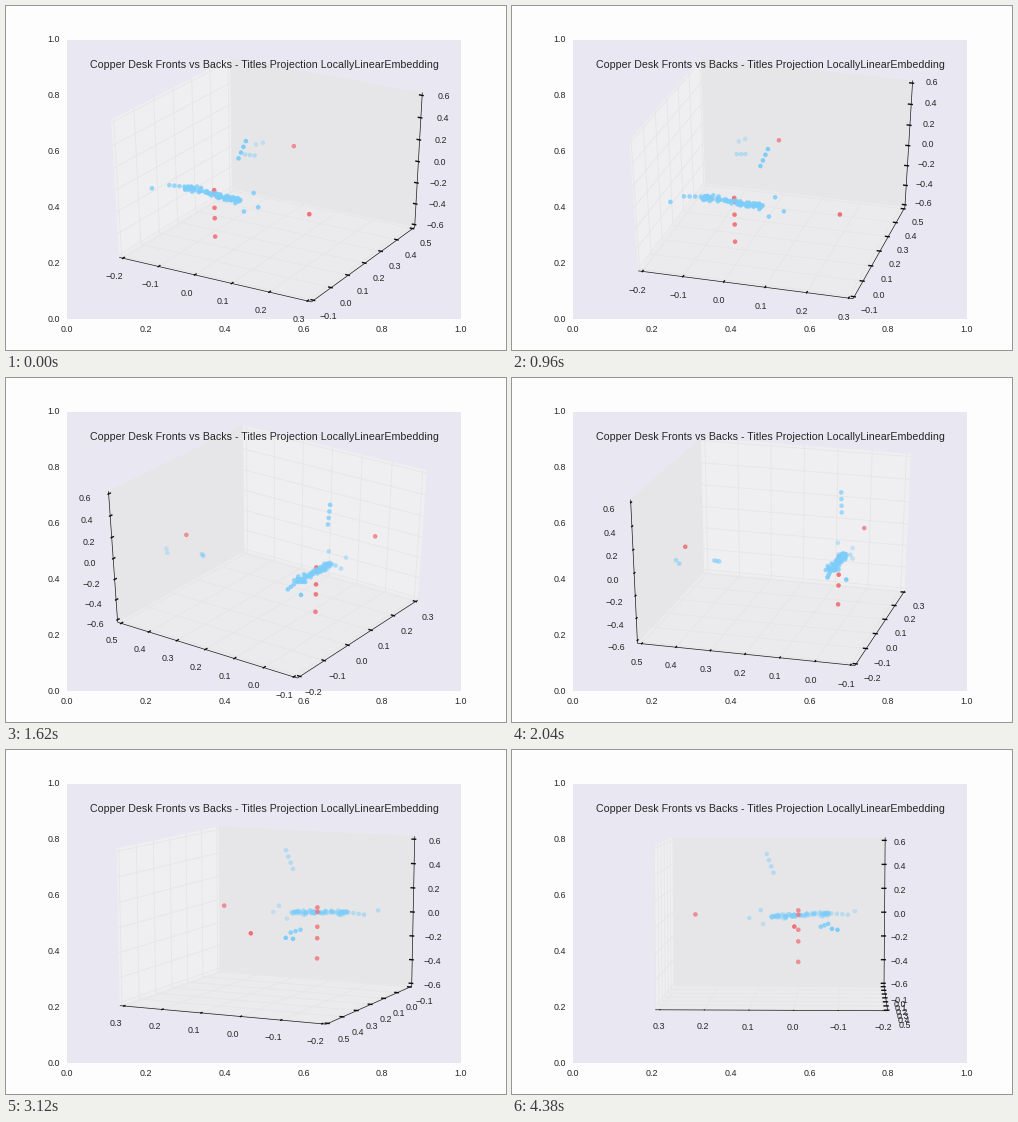
Animation of 500x344 px, one loop 4500 ms. Source, as a matplotlib script:

```python
import numpy as np
import matplotlib.pyplot as plt
from matplotlib.animation import FuncAnimation
from matplotlib.collections import LineCollection
from matplotlib.colors import to_rgb

WIDTH, HEIGHT, DPI = 500, 344, 100
LEFT, RIGHT, TOP, BOTTOM = 61, 455, 34, 313
FRAMES, INTERVAL = 75, 60
INK, RED, BLUE = "0.15", "#f07078", "#7ccdfa"
EDGE = 0.5 + 1 / 48          # the panes reach a little past the limits
LABEL_GAP, LABEL_DROP = 0.076, 3
TICKS = [np.linspace(-0.2, 0.3, 6), np.linspace(-0.1, 0.5, 7), np.linspace(-0.6, 0.6, 7)]
TICK_DIR = [1, 0, 0]
ORIGIN = np.array([-0.1, -1 / 3, 0])     # data zero inside the unit cube

# Camera keys: frame, azimuth, elevation
CAMERA = np.array([(10, -60, 30), (21, -97, 39), (27, -145, 34),
                   (43, -187, 18), (52, -245, 12), (73, -268, 6)])

plt.rcParams["font.family"] = "Liberation Sans"


def px(size):
    return size * 72 / DPI


def monotone_curve(t, times, values):
    """Smooth interpolation that never overshoots the keys."""
    step = np.diff(times)
    slope = np.diff(values) / step
    tangent = np.zeros(len(values))
    tangent[-1] = slope[-1]
    for i, (a, b) in enumerate(zip(slope, slope[1:]), 1):
        if a * b > 0:
            tangent[i] = 2 * a * b / (a + b)
    t = np.clip(t, times[0], times[-1])
    i = min(np.searchsorted(times, t, side="right") - 1, len(step) - 1)
    u, h = (t - times[i]) / step[i], step[i]
    return ((1 + 2 * u) * (1 - u) ** 2 * values[i] + u * (1 - u) ** 2 * h * tangent[i]
            + u * u * (3 - 2 * u) * values[i + 1] + u * u * (u - 1) * h * tangent[i + 1])


def project(points, azim, elev):
    """Perspective view of unit-cube points: stage positions and depth."""
    x, y, z = np.moveaxis(np.asarray(points, float), -1, 0)
    a, e = np.radians([azim, elev])
    toward = x * np.cos(a) + y * np.sin(a)
    across = -x * np.sin(a) + y * np.cos(a)
    up = z * np.cos(e) - toward * np.sin(e)
    depth = 10 - toward * np.cos(e) - z * np.sin(e)
    u = (across / depth + 0.095) / 0.185
    v = (up / depth + 0.095) / 0.185
    return np.stack([LEFT + (RIGHT - LEFT) * u, BOTTOM - (BOTTOM - TOP) * v], -1), depth


def red_points():
    """Points on the three data axes, most of them dropping below zero."""
    drop = np.append([0.03, 0], -0.104 * 1.77 ** np.arange(3))
    column = ORIGIN + np.outer(drop, (0, 0, 1))
    return np.vstack([column, ORIGIN + (0, 0.745, 0), ORIGIN + (0.5, 0, 0)])


def blue_points(count=80):
    """A dense streak along x with short strands around it."""
    rng = np.random.default_rng(4)
    x = 0.035 - 0.29 * rng.random(count) ** 1.4
    y = rng.normal(ORIGIN[1], 0.012, count)
    z = -0.08 * (x + 0.15) + rng.normal(0, 0.006, count)
    return np.vstack([
        np.column_stack([x, y, z]),
        np.linspace((-0.26, -0.335, 0.01), (-0.34, -0.34, 0), 4),
        np.linspace((0.052, -0.3, 0.418), (0.02, -0.312, 0.29), 4),
        np.linspace((-0.25, 0.2, -0.005), (-0.217, 0.234, -0.02), 3),
        np.linspace((-0.294, 0.379, -0.024), (-0.269, 0.403, -0.015), 2),
        np.linspace((0.08, -0.282, 0.036), (0.072, -0.357, -0.067), 2),
        [(0.138, -0.34, -0.024), (-0.374, -0.435, 0.015)],
    ])


fig = plt.figure(figsize=(WIDTH / DPI, HEIGHT / DPI), dpi=DPI, facecolor="#fdfdfd")
ax = fig.add_axes([0, 0, 1, 1])
ax.set_xlim(0, WIDTH)
ax.set_ylim(HEIGHT, 0)
ax.axis("off")


def write(x, y, text, size=8.9, **style):
    style = {"ha": "center", "va": "center", "color": INK, "zorder": 5, **style}
    return ax.text(x, y, text, fontsize=px(size), **style)


def draw_backdrop():
    ax.add_patch(plt.Rectangle((LEFT, TOP), RIGHT - LEFT, BOTTOM - TOP,
                               fc="#e9e7f1", ec="none", zorder=0))
    for share in np.linspace(0, 1, 6):
        write(LEFT + share * (RIGHT - LEFT), 323, f"{share:.1f}")
        write(54, BOTTOM - share * (BOTTOM - TOP), f"{share:.1f}", ha="right")
    write((LEFT + RIGHT) / 2, 62,
          "Copper Desk Fronts vs Backs - Titles Projection LocallyLinearEmbedding",
          10.6, va="baseline", zorder=9)


def line_set(width, color, zorder):
    lines = LineCollection([], linewidths=px(width), colors=color, zorder=zorder)
    return ax.add_collection(lines, autolim=False)


class Dots:
    """A scatter whose farther points fade."""

    def __init__(self, points, color, fade):
        self.points, self.color, self.fade = points, to_rgb(color), fade
        self.artist = ax.scatter(*np.zeros((2, len(points))), s=px(4.6) ** 2, linewidths=0)

    def place(self, view):
        spot, depth = project(self.points, *view)
        order = np.argsort(-depth)
        alpha = 1 - self.fade * (depth - depth.min()) / np.ptp(depth)
        self.artist.set_offsets(spot[order])
        self.artist.set_facecolors([(*self.color, a) for a in alpha[order]])
        self.artist.set_zorder(8 - depth.mean() / 100)


draw_backdrop()
panes = [ax.add_patch(plt.Polygon(np.zeros((4, 2)), fc=shade, ec="none", alpha=0.8, zorder=1))
         for shade in ("0.945", "0.90", "0.925")]
grid = line_set(0.87, "0.9", 2)
spines = line_set(0.7, "0.1", 3)
marks = line_set(1.4, "0.05", 4)
labels = [[write(0, 0, f"{v:.1f}".replace("-", "\u2212") if abs(v) > 0.01 else "0.0")
           for v in ticks] for ticks in TICKS]
clouds = [Dots(red_points(), RED, 0.25), Dots(blue_points(), BLUE, 0.65)]


def place_box(view):
    azim = np.radians(view[0])
    far = -EDGE * np.array([np.sign(np.cos(azim)), np.sign(np.sin(azim)), 1])
    homes = np.array([(0, -far[1], far[2]), (-far[0], 0, far[2]), (-far[0], far[1], 0)])
    grid_lines, spine_lines, mark_lines = [], [], []

    for axis, home in enumerate(homes):
        j, k = [i for i in range(3) if i != axis]

        corners = np.tile(far, (4, 1))
        corners[:, j] = EDGE * np.array([-1, 1, 1, -1])
        corners[:, k] = EDGE * np.array([-1, -1, 1, 1])
        panes[axis].set_xy(project(corners, *view)[0])

        ends = np.tile(home, (2, 1))
        ends[:, axis] = -EDGE, EDGE
        spine_lines.append(project(ends, *view)[0])

        for at, label in zip(np.linspace(-0.5, 0.5, len(TICKS[axis])), labels[axis]):
            path = np.tile(far, (3, 1))
            path[:, axis] = at
            path[0, j], path[2, k] = -far[j], -far[k]
            grid_lines.append(project(path, *view)[0])

            base = home.copy()
            base[axis] = at
            side = TICK_DIR[axis]
            mark = np.tile(base, (2, 1))
            mark[:, side] += np.sign(base[side]) * np.array([0.1, -0.2]) / 12
            mark_lines.append(project(mark, *view)[0])

            spot, _ = project(base + LABEL_GAP * np.sign(home), *view)
            label.set_position(spot + (0, LABEL_DROP))

    grid.set_segments(grid_lines)
    spines.set_segments(spine_lines)
    marks.set_segments(mark_lines)


def update(frame):
    view = [monotone_curve(frame, CAMERA[:, 0], CAMERA[:, i]) for i in (1, 2)]
    place_box(view)
    for cloud in clouds:
        cloud.place(view)
    return []


anim = FuncAnimation(fig, update, frames=FRAMES, interval=INTERVAL, repeat=True,
                     repeat_delay=0, init_func=lambda: update(0))
plt.show()
```
